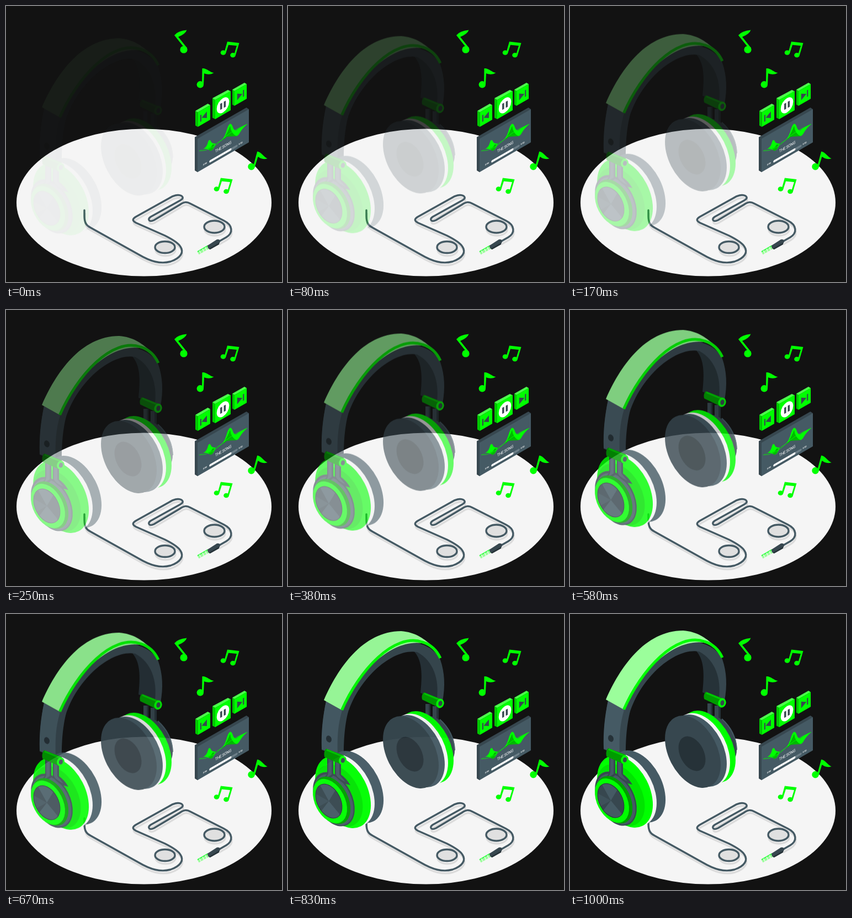
Recreate the animation shown at these times as an HTML page without scripts. Size 500 px wide and 500 px high, loop 1.04 s.

```html
<!DOCTYPE html>
<html lang="en">
<head>
<meta charset="utf-8">
<title>Headphones</title>
<style>
html, body { margin: 0; width: 100%; height: 100%; overflow: hidden; background: #121212; }
svg { display: block; width: 100vw; height: 100vh; }
.lime { fill: #0f0; }
.fern { fill: #00c800; }
.leaf { fill: #009c00; }
.mint { fill: #9bfe9b; }
.glow { fill: #4dff4d; }
.ink { fill: #263238; }
.slate { fill: #37474f; }
.steel { fill: #455a64; }
.snow { fill: #f5f5f5; }
.line { fill: none; stroke: #455a64; stroke-width: 3.4; stroke-linecap: round; stroke-linejoin: round; }
text { fill: #fff; font-family: Roboto, Arial, sans-serif; }
#phones { animation: rise 1040ms -5ms infinite; }
/* 24 held poses per second, easing out */
@keyframes rise {
  0% { opacity: .05; transform: translateY(28.4px); animation-timing-function: steps(2); }
  7.69% { opacity: .2; transform: translateY(24.5px); animation-timing-function: steps(4); }
  24.04% { opacity: .44; transform: translateY(17px); animation-timing-function: steps(5); }
  44.23% { opacity: .685; transform: translateY(9.7px); animation-timing-function: steps(5); }
  64.42% { opacity: .88; transform: translateY(3.8px); animation-timing-function: steps(4); }
  79.81% { opacity: .965; transform: translateY(1px); animation-timing-function: steps(4); }
  96.15%, 100% { opacity: 1; transform: none; }
}
</style>
</head>
<body>
<svg viewBox="0 0 500 500">
  <defs>
    <ellipse id="cup" rx="44" ry="70" transform="rotate(-27)"/>
    <path id="cord" d="M142 370V381C142 393 146 398 154 402L240 450C262 463 280 468 298 463C316 457 323 446 316 436C312 429 300 422 288 416L236 393C228 389 229 386 235 382L296 348C303 343 312 341 318 344C322 347 320 350 316 352L262 382C255 387 260 392 268 388L315 360C322 355 327 354 334 358L395 389C411 397 412 411 399 419L385 427"/>
    <g id="loops">
      <ellipse cx="288" cy="437" rx="18" ry="10.5"/>
      <ellipse cx="377.500" cy="400" rx="18.500" ry="11"/>
    </g>
    <g id="pair" class="lime">
      <ellipse cx="393.500" cy="84.500" rx="4.800" ry="4.300"/>
      <ellipse cx="411" cy="89" rx="4.800" ry="4.300"/>
      <path d="M395.500 84L401 64.500L422.500 67L415.800 89.500L413 88.500L418 72L403 70.500L398.300 85Z"/>
    </g>
    <g id="single" class="lime">
      <circle cx="351.800" cy="142.300" r="6.200"/>
      <path d="M355 142L355.500 113C363 112 369 120 376.500 121C370 125 364 124 359 122L358 142Z"/>
    </g>
    <clipPath id="disc"><ellipse rx="21" ry="33" transform="rotate(-27)"/></clipPath>
  </defs>

  <rect width="500" height="500" fill="#121212"/>
  <ellipse class="snow" cx="250" cy="356" rx="231" ry="133.500"/>

  <!-- cable -->
  <g transform="translate(1 5)" fill="none" stroke="#dcdcdc" stroke-width="3.4">
    <use href="#cord"/><use href="#loops"/>
  </g>
  <use href="#loops" fill="#e0e0e0"/>
  <g class="line"><use href="#cord"/><use href="#loops"/></g>
  <path d="M348 447.500L367 436.500" stroke="#9bfe9b" stroke-width="6.500"/>
  <path d="M347 445L366 434" stroke="#3f4" stroke-width="2"/>
  <path d="M350.500 443l3 6M356 440l3 6M361 437l3 6" stroke="#f5f5f5" stroke-width="1.300"/>
  <path class="slate" d="M365 434L382 423Q388 422 388 427L386 431L370 440.500Q365 440 365 434Z"/>
  <path class="ink" d="M367 440L386 429V432L370 441Z"/>

  <g id="phones">
    <!-- far cup -->
    <path class="slate" d="M249 162H258V200H249ZM262 166H273V204H262Z"/>
    <path class="ink" d="M255 162H258V200H255ZM269 166H273V204H269Z"/>
    <ellipse class="slate" rx="36" ry="50" transform="translate(263 231) rotate(-27)"/>
    <path d="M275 190Q300 212 302 246" fill="none" stroke="#455a64" stroke-width="2"/>
    <use href="#cup" x="249.500" y="240.500" class="lime"/>
    <use href="#cup" x="239.500" y="245" class="snow"/>
    <use href="#cup" x="233.500" y="247.500" class="steel"/>
    <use href="#cup" x="222.500" y="249.500" class="slate"/>
    <ellipse class="ink" rx="21.500" ry="33.500" transform="translate(221 253) rotate(-27)"/>

    <!-- headband -->
    <path class="ink" d="M228 66C240 80 245 98 240 142L271 153C275 120 264 85 238 68Z"/>
    <path class="slate" d="M61 245C61 215 63 185 69 157L97 173C115 125 160 56 215 50C245 49 268 64 276 82C284 105 285 130 280 157L270 152C274 118 264 84 234 68C190 60 128 115 108 180C102 205 101 235 101 250L90 257Z"/>
    <path class="steel" d="M69 157L98 174C90 200 89 225 90 254L61 244C60 212 63 185 69 157Z"/>
    <ellipse class="ink" cx="74" cy="225.500" rx="4.800" ry="6.300" transform="rotate(-20 74 225.500)"/>
    <path class="mint" d="M65 155C90 98 135 30 205 30C231 32 246 44 258 54L262 58C204 30 130 95 97 173Z"/>
    <path d="M97.500 173C129 101 192 32 244 50C260 55 270 66 276 79" fill="none" stroke="#0f0" stroke-width="5"/>

    <!-- far hinge -->
    <path class="leaf" d="M246 141L277 153L272 168L243 154Q241 146 246 141Z"/>
    <path d="M247 143L276 155" stroke="#00c800" stroke-width="3"/>
    <ellipse class="lime" cx="275.500" cy="161" rx="7" ry="8.500" transform="rotate(15 275.500 161)"/>
    <ellipse class="slate" cx="276" cy="161" rx="3.500" ry="4.800" transform="rotate(15 276 161)"/>

    <!-- near cup -->
    <use href="#cup" x="122.600" y="312.500" class="steel"/>
    <use href="#cup" x="106.500" y="318.500" class="snow"/>
    <use href="#cup" x="99.600" y="321.500" class="lime"/>
    <ellipse fill="#00e400" rx="38" ry="60" transform="translate(92 328) rotate(-27)"/>
    <ellipse class="slate" rx="33" ry="52.500" transform="translate(83 334.500) rotate(-27)"/>
    <ellipse class="steel" rx="31" ry="49.500" transform="translate(83 335.500) rotate(-27)"/>
    <path class="slate" d="M71 258H82V292L68 302L59 298Q70 294 71 286ZM85 262H96V290Q105 296 113 309L101 306Q88 298 85 290Z"/>
    <path class="steel" d="M73 260H79V290L66 298Q73 292 73 286ZM87 264H93V290L104 303Q89 296 87 290Z"/>
    <ellipse class="leaf" rx="29" ry="46" transform="translate(80 336.500) rotate(-27)"/>
    <ellipse class="lime" rx="27" ry="43" transform="translate(76 338) rotate(-27)"/>
    <g transform="translate(74 338)">
      <g clip-path="url(#disc)">
        <path class="slate" d="M-40-50H40V50H-40Z"/>
        <path class="steel" d="M0 0L-22-40H24ZM0 0L-26 34H28Z"/>
        <path d="M0 0L-40-22V22Z" fill="#3e515a"/>
      </g>
      <ellipse rx="21" ry="33" transform="rotate(-27)" fill="none" stroke="#263238"/>
    </g>

    <!-- near hinge -->
    <path class="leaf" d="M69 243L101 255L97 272L66 258Q64 248 69 243Z"/>
    <path d="M70 245L99 257" stroke="#00c800" stroke-width="3"/>
    <ellipse class="lime" cx="99" cy="264" rx="6.800" ry="8" transform="rotate(15 99 264)"/>
    <ellipse class="slate" cx="99.500" cy="264" rx="3.500" ry="4.500" transform="rotate(15 99 264)"/>
  </g>

  <!-- notes -->
  <circle class="lime" cx="322" cy="79" r="6.600"/>
  <path class="lime" d="M305 53Q311 45 327.500 43.500Q325 51 312 56L328 76L325 78Z"/>
  <use href="#pair"/>
  <use href="#pair" x="-12" y="247"/>
  <use href="#single"/>
  <use href="#single" transform="translate(444.500 291) rotate(14) translate(-351.800 -142.300)"/>

  <!-- buttons -->
  <g>
    <path class="fern" d="M343 190l4.500 2.500V219l-4.500-2.500Z"/>
    <path class="glow" d="M343 190l22.500-13 4.500 2.500-22.500 13Z"/>
    <g transform="matrix(.866 -.5 0 1 347.500 192.500)">
      <rect class="lime" width="26" height="26.500"/>
      <path class="slate" d="M5 8H7.500V20H5ZM8 14L19 8V20Z"/>
    </g>
    <path class="fern" d="M374 167l5 2.500V205l-5-2.500Z"/>
    <path class="glow" d="M374 167l28-15 5 2.500-28 15.500Z"/>
    <g transform="matrix(.866 -.5 0 1 379 170)">
      <rect class="lime" width="32.300" height="35"/>
      <circle cx="16.200" cy="18" r="13" fill="#fff"/>
      <path class="slate" d="M10.500 12.500H14.500V23.500H10.500ZM18 12.500H22V23.500H18Z"/>
    </g>
    <path class="fern" d="M410 151.500l4 2.500V181l-4-2.500Z"/>
    <path class="glow" d="M410 151.500l22-12.500 4 2.500-22 12.500Z"/>
    <g transform="matrix(.866 -.5 0 1 414 154)">
      <rect class="lime" width="25.500" height="26.800"/>
      <path class="slate" d="M5.500 7.500L16.500 13.500L5.500 19.500ZM17.500 7.500H20V19.500H17.500Z"/>
    </g>
  </g>

  <!-- player -->
  <path class="slate" d="M342 237.500L435.500 184L440 187L347 301L342 298Z"/>
  <path class="steel" d="M347 240.500L440 187V247L347 301Z"/>
  <path class="lime" d="M350 262Q362 259 365 250Q368 237 372 247Q378 252 386 246Q394 243 399 228Q405 206 410 217Q414 230 420 223Q426 219 437 214Q428 222 424 229Q419 239 413 234Q405 228 398 237Q388 245 380 249Q374 266 368 261Q363 256 350 262Z"/>
  <path fill="#00b800" d="M366 257Q370 260 374 251Q384 250 394 241Q402 228 406 217Q408 232 418 236Q408 236 400 237Q390 246 378 250Q374 266 368 261Z"/>
  <path d="M350 262.500Q370 263 388 245T437 214" fill="none" stroke="#0f0" stroke-width=".8"/>
  <g transform="matrix(.866 -.5 0 1 347 240.500)">
    <text x="37" y="44" font-size="7.500" letter-spacing="-.3">THE SONG</text>
    <g fill="none" stroke-width="3.800" stroke-linecap="round">
      <path d="M26.500 54H82" stroke="#6d7f88"/>
      <path d="M26.500 54H69" stroke="#fff"/>
    </g>
    <g font-size="4" font-weight="700">
      <text x="11.500" y="54.500">0:00</text>
      <text x="86" y="54.500">4:50</text>
    </g>
  </g>
</svg>
</body>
</html>
```
